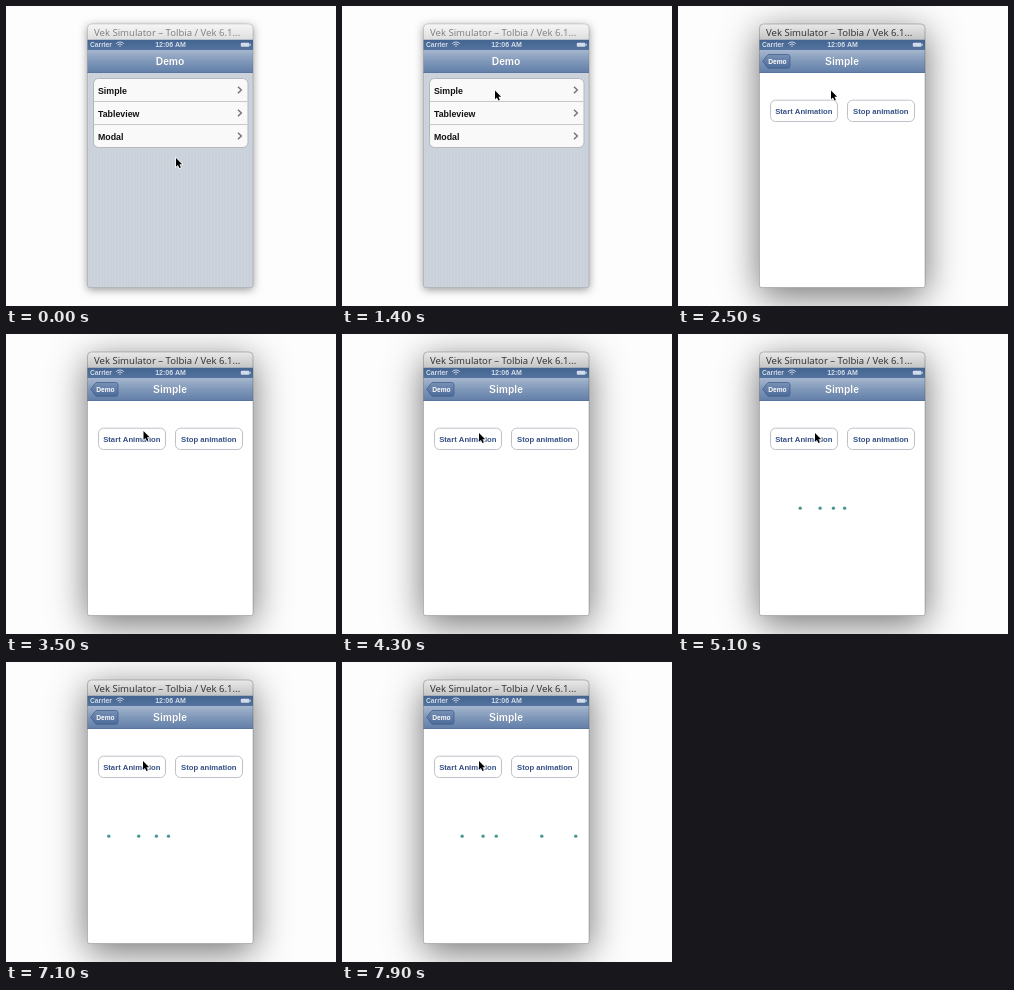
An HTML page with a canvas that plays this animation: 330 by 300 pixels, repeating every 8000 ms.

```html
<!DOCTYPE html>
<html lang="en">
<head>
<meta charset="utf-8">
<title>Dot indicator demo</title>
<style>
html, body { margin: 0; width: 100%; height: 100%; overflow: hidden; background: #fdfdfd; }
canvas { display: block; width: 330px; height: 300px; }
</style>
</head>
<body>
<canvas id="stage"></canvas>
<script>
const W = 330, H = 300, LOOP = 8000;
const WIN = { x: 81.5, y: 18, w: 165.5, h: 263.5 };
const canvas = document.getElementById('stage');
const ctx = canvas.getContext('2d');
const ratio = window.devicePixelRatio || 1;
canvas.width = W * ratio;
canvas.height = H * ratio;

const SANS = '"Liberation Sans", sans-serif';
const clamp = v => Math.max(0, Math.min(1, v));
const ease = v => v * v * (3 - 2 * v);
const progress = (t, from, to) => ease(clamp((t - from) / (to - from)));

// Linear interpolation through [time, value] points
function along(points, t) {
  let i = 1;
  while (i < points.length - 1 && t > points[i][0]) i++;
  const [t0, v0] = points[i - 1], [t1, v1] = points[i];
  return v0 + (v1 - v0) * clamp((t - t0) / (t1 - t0));
}

function gradient(y0, y1, ...colors) {
  const g = ctx.createLinearGradient(0, y0, 0, y1);
  colors.forEach((c, i) => g.addColorStop(i / (colors.length - 1), c));
  return g;
}

function round(x, y, w, h, r) {
  ctx.beginPath();
  ctx.roundRect(x, y, w, h, r);
}

function rect(x, y, w, h, fill) {
  ctx.fillStyle = fill;
  ctx.fillRect(x, y, w, h);
}

function text(s, x, y, size, color, align = 'left', weight = 'bold', family = SANS) {
  ctx.font = `${weight} ${size}px ${family}`;
  ctx.textAlign = align;
  ctx.fillStyle = color;
  ctx.fillText(s, x, y);
}

function polyline(points, color, width) {
  ctx.beginPath();
  points.forEach(([x, y]) => ctx.lineTo(x, y));
  ctx.strokeStyle = color;
  ctx.lineWidth = width;
  ctx.stroke();
}

function shadow(color, blur, dy) {
  ctx.shadowColor = color;
  ctx.shadowBlur = blur * ratio;
  ctx.shadowOffsetY = dy * ratio;
}

function drawFrame(active) {
  ctx.save();
  if (active) shadow('rgba(0,0,0,.56)', 36, 8);
  else shadow('rgba(0,0,0,.42)', 8, 2);
  round(WIN.x, WIN.y, WIN.w, WIN.h, [4, 4, 2, 2]);
  ctx.fillStyle = '#ddd';
  ctx.fill();
  ctx.restore();

  round(WIN.x, WIN.y, WIN.w, 16, [4, 4, 0, 0]);
  ctx.fillStyle = active ? gradient(18, 34, '#e9e9e9', '#c4c4c4') : gradient(18, 34, '#f6f6f6', '#dedede');
  ctx.fill();
  text('Vek Simulator – Tolbia / Vek 6.1...', 88, 30, 9.6, active ? '#2b2b2b' : '#7d7d7d',
    'left', 'normal', '"Open Sans", sans-serif');
}

function drawStatus() {
  const ink = '#d3dcea';
  rect(81, 33.5, 166.5, 10.5, gradient(33, 44, '#43638f', '#54739f'));
  text('Carrier', 84, 41.1, 6.7, ink);
  text('12:06 AM', 164.5, 41.1, 7, ink, 'center');
  ctx.strokeStyle = ink;
  ctx.lineWidth = 1;
  for (const r of [1, 3, 5]) {
    ctx.beginPath();
    ctx.arc(114, 41, r, -Math.PI * .78, -Math.PI * .22);
    ctx.stroke();
  }
  round(234.8, 36.8, 8.6, 4, 1);
  ctx.fillStyle = ink;
  ctx.fill();
  rect(243.7, 37.8, 1, 2, ink);
}

function navTitle(s, x, alpha) {
  ctx.globalAlpha = alpha;
  ctx.save();
  shadow('rgba(35,55,90,.5)', 0, -0.6);
  text(s, x, 59.3, 10.3, '#fff', 'center');
  ctx.restore();
  ctx.globalAlpha = 1;
}

function backButton(dx, alpha) {
  ctx.save();
  ctx.globalAlpha = alpha;
  ctx.translate(dx, 0);
  ctx.beginPath();
  ctx.moveTo(84.5, 55.3);
  ctx.lineTo(90, 48.5);
  ctx.lineTo(109.5, 48.5);
  ctx.quadraticCurveTo(112, 48.5, 112, 51);
  ctx.lineTo(112, 59.8);
  ctx.quadraticCurveTo(112, 62.3, 109.5, 62.3);
  ctx.lineTo(90, 62.3);
  ctx.closePath();
  ctx.fillStyle = gradient(48, 62, '#7a92b6', '#4c6b99');
  ctx.fill();
  ctx.strokeStyle = '#46638f';
  ctx.lineWidth = .8;
  ctx.stroke();
  text('Demo', 90.2, 57.7, 6.6, '#fff');
  ctx.restore();
}

function drawNav(p) {
  rect(81, 44, 166.5, 23, gradient(44, 67, '#a6b7cf', '#7f97b9', '#617ea8'));
  rect(81, 66.3, 166.5, .7, '#56729b');
  if (p < 1) navTitle('Demo', 164 - 100 * p, 1 - p * p);
  if (p > 0) {
    navTitle('Simple', 164 + 100 * (1 - p), p);
    backButton(60 * (1 - p), clamp(2 * p - 1));
  }
}

function drawMenu(selected) {
  rect(81, 67, 166.5, 215, '#cbd1da');
  for (let x = 82; x < 247; x += 3) rect(x, 67, 1, 215, '#ced4dc');
  round(87.5, 72.5, 154.5, 69, 5);
  ctx.save();
  ctx.fillStyle = '#f9f9f9';
  ctx.fill();
  ctx.clip();
  if (selected) rect(87, 72, 156, 23.5, gradient(72, 95.5, '#c3c3c3', '#a4a4a4'));
  ctx.restore();
  ctx.strokeStyle = '#b3b8be';
  ctx.lineWidth = 1;
  ctx.stroke();
  ['Simple', 'Tableview', 'Modal'].forEach((label, i) => {
    const y = 84 + 23 * i, lit = selected && i === 0;
    if (i) rect(88, y - 12, 153.5, 1, '#c6c9cc');
    text(label, 92, y + 3.5, 8.8, lit ? '#fff' : '#111');
    polyline([[232, y - 3.2], [235.3, y], [232, y + 3.2]], lit ? '#fff' : '#777', 1.5);
  });
}

function button(label, x, pressed) {
  round(x, 94.2, 67, 21.3, 5);
  ctx.fillStyle = pressed ? gradient(94, 116, '#4c94f0', '#0c55dc') : '#fff';
  ctx.fill();
  ctx.strokeStyle = '#b5bac1';
  ctx.lineWidth = .9;
  ctx.stroke();
  text(label, x + 33.3, 107.6, 7.7, pressed ? '#fff' : '#344f85', 'center');
}

// Each dot's travel over one period; a full crossing is SPAN, and positions wrap
const PERIOD = 675, LEFT = 70, SPAN = 185, PHASE = 5100, START = 4250;
const DOTS = [
  [[0, 122], [100, 141], [300, 155], [525, 204], [590, 255], [610, 255], [675, 307]],
  [[0, 70], [40, 70], [100, 120], [250, 142], [400, 156], [525, 185], [610, 255], [675, 255]],
  [[0, 166], [100, 233], [130, 255], [230, 255], [320, 300], [525, 329], [675, 351]],
  [[0, 155], [100, 199], [170, 255], [270, 255], [360, 293], [525, 311], [675, 340]],
  [[0, 142], [100, 154], [220, 185], [300, 255], [480, 255], [525, 269], [675, 327]]
];

function travel(path, t) {
  const cycle = Math.floor((t - PHASE) / PERIOD);
  return along(path, t - PHASE - cycle * PERIOD) + cycle * SPAN - LEFT;
}

function drawDots(t) {
  if (t < START) return;
  ctx.fillStyle = '#48968f';
  for (const path of DOTS) {
    const d = travel(path, t), lap = Math.floor(d / SPAN);
    if (lap <= Math.floor(travel(path, START) / SPAN)) continue;
    ctx.beginPath();
    ctx.arc(LEFT + d - lap * SPAN, 174.2, 1.65, 0, 7);
    ctx.fill();
  }
}

function drawDemo(t) {
  rect(81, 67, 166.5, 215, '#fff');
  button('Start Animation', 92.5, t >= 4000 && t < 4100);
  button('Stop animation', 169.5, false);
  drawDots(t);
}

function drawCursor(t) {
  const a = progress(t, 50, 1350), b = progress(t, 2650, 3500), c = progress(t, 3500, 3800);
  ctx.save();
  ctx.translate(170 - 17 * a - 15.5 * b - .5 * c, 152 - 67.5 * a + 12.5 * b + 2 * c);
  ctx.scale(.92, .92);
  ctx.beginPath();
  [[0, 0], [0, 9.4], [2.1, 7.5], [3.7, 11], [5.3, 10.3], [3.8, 6.9], [6.7, 6.8]]
    .forEach(([x, y]) => ctx.lineTo(x, y));
  ctx.closePath();
  ctx.strokeStyle = '#fff';
  ctx.lineWidth = 1.4;
  ctx.stroke();
  ctx.fillStyle = '#000';
  ctx.fill();
  ctx.restore();
}

function render(t) {
  ctx.setTransform(ratio, 0, 0, ratio, 0, 0);
  rect(0, 0, W, H, '#fdfdfd');
  drawFrame(t >= 1800);

  const push = progress(t, 2085, 2435);
  ctx.save();
  round(WIN.x, 33.5, WIN.w, 248, [0, 0, 2, 2]);
  ctx.clip();
  ctx.save();
  ctx.translate(-WIN.w * push, 0);
  if (push < 1) drawMenu(t >= 1900);
  ctx.translate(WIN.w, 0);
  if (push > 0) drawDemo(t);
  ctx.restore();
  drawStatus();
  drawNav(push);
  ctx.restore();

  round(WIN.x, WIN.y, WIN.w, WIN.h, [4, 4, 2, 2]);
  ctx.strokeStyle = t >= 1800 ? 'rgba(60,60,60,.5)' : 'rgba(90,90,90,.35)';
  ctx.lineWidth = .6;
  ctx.stroke();
  drawCursor(t);
}

const begin = performance.now();
function tick() {
  render((performance.now() - begin) % LOOP);
  requestAnimationFrame(tick);
}
tick();
</script>
</body>
</html>
```
